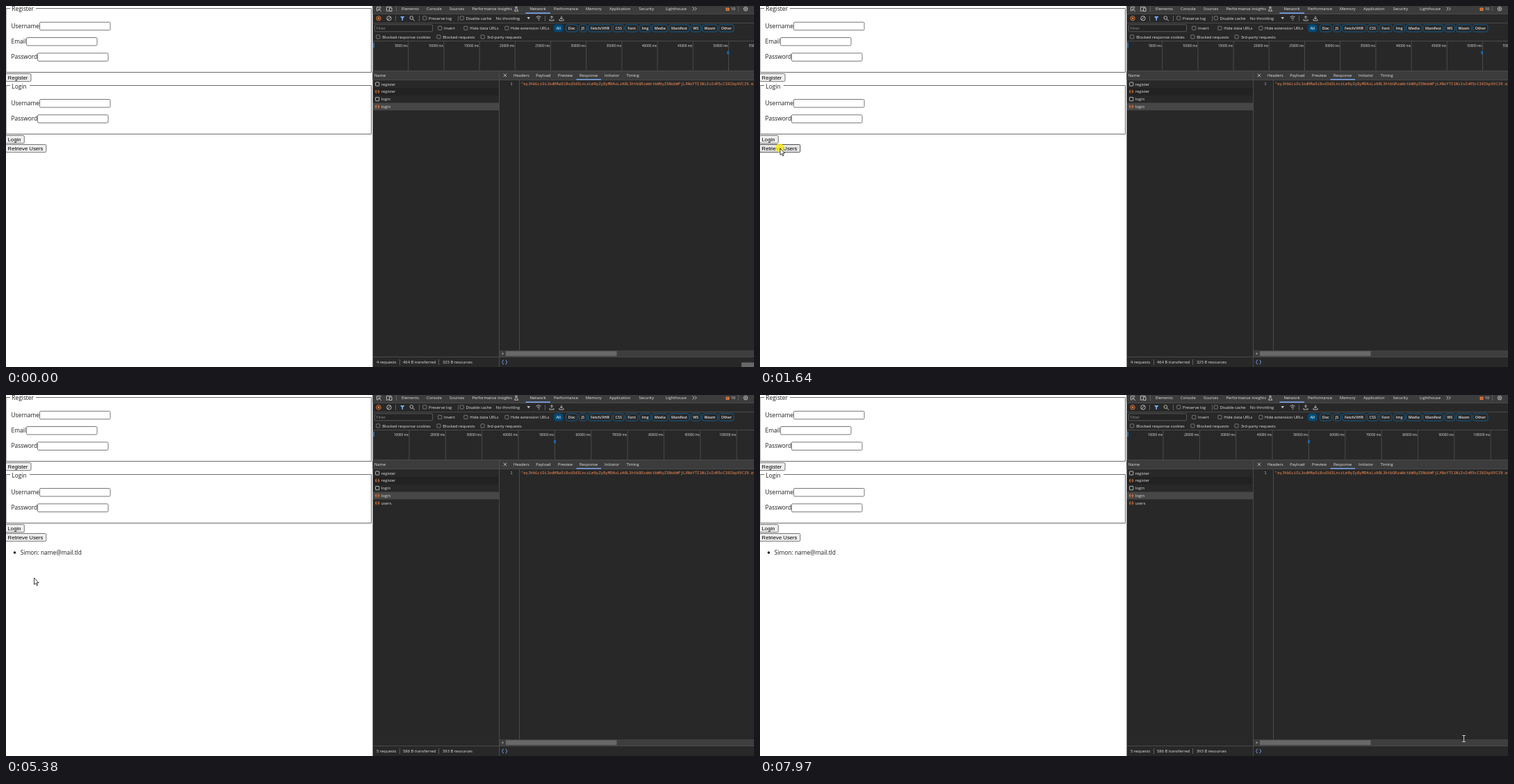
An HTML page for the animation above (8 s loop, 1076 px wide and 520 px high).

```html
<!DOCTYPE html>
<html lang="en">
<head>
<meta charset="utf-8">
<title>Login form and network panel</title>
<style>
html, body { margin: 0; width: 100%; height: 100%; overflow: hidden; background: #fff; }
svg { display: block; width: 1076px; height: 520px; }
text { white-space: pre; font: 5.8px "Open Sans", "Noto Sans", sans-serif; fill: #e3e3e3; }
.page { font-size: 8.4px; fill: #1c1c1c; }
.btn { font: 7.7px "Liberation Sans", Arial, sans-serif; fill: #000; }
.ms { font-size: 4.7px; text-anchor: end; }
.pill { font-size: 5.4px; font-weight: 600; text-anchor: middle; }
.code { font: 5.62px "DejaVu Sans Mono", "Noto Sans Mono", monospace; fill: #f28b54; }
.num { fill: #8ab4f8; }
.dim { fill: #8f8f8f; }
.ico { fill: none; stroke: #c7c7c7; stroke-width: .9; }
.blue { stroke: #7cacf8; }
.orange { stroke: #f0803c; }
</style>
</head>
<body>
<svg id="stage" viewBox="0 0 1076 520"></svg>
<script>
const NS = "http://www.w3.org/2000/svg";
const stage = document.getElementById("stage");

function add(tag, attrs, parent = stage) {
  const el = document.createElementNS(NS, tag);
  for (const k in attrs) el.setAttribute(k, attrs[k]);
  parent.appendChild(el);
  return el;
}
const rect = (x, y, width, height, fill, more, parent) =>
  add("rect", { x, y, width, height, fill, ...more }, parent);
const path = (d, cls = "ico", more, parent) => add("path", { d, class: cls, ...more }, parent);
const line = (d, stroke) => add("path", { d, stroke, fill: "none" });
function text(s, x, y, cls = "", parent = stage) {
  const el = add("text", { x, y, class: cls }, parent);
  el.textContent = s;
  return el;
}
const show = (el, on) => el.setAttribute("visibility", on ? "visible" : "hidden");

// Web page
const EDGE = "#767676";
rect(0, 0, 528, 520, "#fff");

function fieldset(title, top, bottom, gapEnd, baseline) {
  line(`M0 ${top}H6M${gapEnd} ${top}H525.5V${bottom}H0`, "#6b6b6b");
  line(`M.5 ${top}V${bottom}`, "#b5b5b5");
  text(title, 8.3, baseline, "page");
}
fieldset("Register", 3.5, 95.5, 43, 7);
fieldset("Login", 114.5, 184.5, 34, 119);

function field(label, baseline, x) {
  text(label, 7.5, baseline, "page");
  rect(x, baseline - 8.5, 101.5, 11.5, "#fff", { rx: 1.5, stroke: EDGE });
}
field("Username", 31.8, 48.5);
field("Email", 54, 29.5);
field("Password", 76.4, 45.5);
field("Username", 143, 48.5);
field("Password", 165.3, 45.5);

function button(label, y, width) {
  const box = rect(-.5, y, width, 11.2, "#efefef", { rx: 1.5, stroke: EDGE });
  text(label, 2.6, y + 8.5, "btn");
  return box;
}
button("Register", 97.5, 36.5);
button("Login", 186.5, 26.8);
const retrieve = button("Retrieve Users", 199.5, 58.3);

const ENTRY = "Simon: name@mail.tld";
const list = add("g", {});
add("circle", { cx: 12.5, cy: 227, r: 1.7, fill: "#111" }, list);
text(ENTRY, 20.8, 230.3, "page", list);
const clip = rect(0, 220, 0, 14, "#000", {}, add("clipPath", { id: "sel" }, add("defs", {})));
const picked = add("g", { "clip-path": "url(#sel)" });
rect(20, 220.5, 89, 13, "#3367d1", {}, picked);
text(ENTRY, 20.8, 230.3, "page", picked).style.fill = "#fff";

// Developer tools
const DARK = "#282828", BAR = "#3c3c3c", RULE = "#4a4a4a";
rect(527.5, 0, 548.5, 520, DARK);
rect(527.5, 0, 548.5, 11, BAR);
rect(527.5, 94, 548.5, 12.5, BAR);
line("M528 11.5H1076M528 24.5H1076M528 50.5H1076M528 93.5H1076M528 106.5H1076", RULE);

const labels = (y, items) => items.forEach(([s, x]) => text(s, x, y));
labels(6.2, [["Elements", 569], ["Console", 605], ["Sources", 638], ["Performance insights", 670.5],
  ["Network", 753.5], ["Performance", 788], ["Memory", 834], ["Application", 868],
  ["Security", 910.5], ["Lighthouse", 949], ["10", 1042.5]]);
rect(747.5, 9.5, 35.5, 1.5, "#7cacf8");
path("M539 2.5V1.5H533.5V7H535M536 4L540 8M536 4V7M536 4H539");
path("M547.5 6V1.5H554.5M546.5 7H551M551.5 3H555V7.5H551.5Z");
path("M732.5 1.5H735.5M733.2 1.5V4L731.5 7.2H736.8L734.9 4V1.5");
path("M987.5 1.5L990 4L987.5 6.5M990.8 1.5L993.3 4L990.8 6.5");
rect(1035.5, 2.5, 5, 4.5, "#f0803c", { rx: .8 });
path("M1036.8 4H1039.2M1036.8 5.5H1039.2", "", { stroke: "#3c3c3c", "stroke-width": .6 });
add("circle", { cx: 1064, cy: 4.2, r: 2.8, class: "ico", "stroke-width": 1.2 });
add("circle", { cx: 1064, cy: 4.2, r: 1, class: "ico" });

const divider = (x, y) => line(`M${x} ${y}v8`, "#5e5e5e");
[[561.5, 0], [1053.5, 0], [560.5, 14], [594.5, 14], [650.5, 14], [775.5, 14],
  [566.5, 509], [622.5, 509]].forEach(d => divider(...d));

add("circle", { cx: 536, cy: 17.8, r: 3.2, class: "ico orange" });
rect(534.7, 16.5, 2.6, 2.6, "#f0803c");
add("circle", { cx: 551, cy: 17.8, r: 3.2, class: "ico" });
path("M553.2 15.5L548.8 20");
path("M567 15H573.5L571 18V21H569.5V18Z", "", { fill: "#7cacf8" });
add("circle", { cx: 583.3, cy: 17, r: 2.3, class: "ico" });
path("M585 18.8L588 21.5");
path("M749.5 16H754L751.7 19.2Z", "", { fill: "#c7c7c7" });
path("M762.5 16Q766 13 769.5 16M764 18Q766 16.2 768 18M765.5 20H767.5");
path("M785 19V14.5M783 16.5L785 14.5L787 16.5M782 19V21H788V19");
path("M799 14.5V19M797 17L799 19L801 17M796 19V21H802V19");

function check(label, x, mid, textX) {
  rect(x, mid - 2.7, 5.2, 5.2, "none", { rx: .8, stroke: "#8a8a8a", "stroke-width": .8 });
  text(label, textX, mid + 2.2);
}
check("Preserve log", 599.7, 17.5, 608);
check("Disable cache", 653.2, 17.5, 661.5);
text("No throttling", 704.8, 19.7);
rect(530.5, 26.8, 83, 10, "#242424", { rx: 1, stroke: "#666", "stroke-width": .8 });
text("Filter", 532.5, 34.2, "dim");
check("Invert", 621.6, 32, 630);
check("Hide data URLs", 658.8, 32, 667.3);
check("Hide extension URLs", 717.8, 32, 726);
check("Blocked response cookies", 532.6, 44.5, 541.3);
check("Blocked requests", 619.8, 44.5, 628.3);
check("3rd-party requests", 683, 44.5, 691.7);

[["All", 788.5, 801], ["Doc", 805.5, 822], ["JS", 824.5, 835.5], ["Fetch/XHR", 837.5, 871.5],
  ["CSS", 873.5, 889], ["Font", 891, 909], ["Img", 911.5, 927.5], ["Media", 929.5, 952],
  ["Manifest", 954, 983], ["WS", 985, 999.5], ["Wasm", 1001.5, 1023.5], ["Other", 1025.5, 1047]
].forEach(([s, a, b], i) => {
  rect(a, 26.8, b - a, 10.4, i ? "none" : "#004a77",
    { rx: 3, stroke: i ? "#0d6299" : "#004a77", "stroke-width": .9 });
  text(s, (a + b) / 2, 34, "pill");
});

// Overview ruler: gap in pixels, step in milliseconds
function ruler(first, gap, step, mark) {
  const g = add("g", {});
  for (let i = 0; i < 11; i++) {
    const x = first + gap * i;
    path(`M${x} 51V93`, "", { stroke: "#4a4a4a" }, g);
    text(`${step * (i + 1)} ms`, x - 1, 58.8, "ms", g);
  }
  rect(mark, 65, 3, 4.5, "#1567ad", {}, g);
  return g;
}
const rulerBefore = ruler(578.7, 51.2, 5000, 1037.2);
const rulerAfter = ruler(580, 52.35, 10000, 788);
line("M528.5 51V93", "#14507e");
rect(528, 53, 2, 7, "#1a73c8");

// Request list
const filler = rect(528, 161, 181, 344.5, "#404040");
rect(528, 118, 181, 10.7, "#222");
rect(528, 139.5, 181, 10.8, "#474747");
text("Name", 530, 102.2);

function request(name, i, isCode) {
  const g = add("g", {}), y = 112.5 + i * 10.8;
  if (isCode) {
    path(`M532.7 ${y - 2.6}Q530 ${y} 532.7 ${y + 2.6}M535.6 ${y - 2.6}Q538.3 ${y} 535.6 ${y + 2.6}` +
      `M533.6 ${y - 1}l-1 1l1 1M534.8 ${y - 1}l1 1l-1 1`, "ico orange", {}, g);
  } else {
    rect(531.6, y - 2.6, 5.2, 5.2, "none", { rx: .6, class: "ico" }, g);
  }
  text(name, 539.8, y + 2.1, "", g);
  return g;
}
request("register", 0);
request("register", 1, true);
request("login", 2);
request("login", 3, true);
const usersRow = request("users", 4, true);

// Response pane
path("M715.8 97.7L720.2 102.1M720.2 97.7L715.8 102.1");
labels(102.2, [["Headers", 730], ["Payload", 762.3], ["Preview", 794], ["Response", 825],
  ["Initiator", 861], ["Timing", 892.5]]);
rect(820.5, 105.2, 35.5, 1.4, "#7cacf8");
line("M709.5 94V520M738.5 107V496", RULE);
text("1", 725.3, 114.3, "code num");
text('"eyJhbGciOiJodHRwOi8vd3d3LnczLm9yZy8yMDAxLzA0L3htbGRzaWctbW9yZSNobWFjLXNoYTI1NiIsInR5cCI6IkpXVCJ9.eyJ',
  740.8, 114.3, "code");
rect(710, 496, 366, 9.5, "#3e3e3e");
rect(719, 497.2, 159.5, 7, "#686868");
path("M715.3 499L713 500.8L715.3 502.6Z", "", { fill: "#a0a0a0" });
line("M528 505.5H1076", RULE);
path("M715.8 510Q714.4 510 714.6 511.8L713.4 513L714.6 514.2Q714.4 516 715.8 516" +
  "M718.6 510Q720 510 719.8 511.8L721 513L719.8 514.2Q720 516 718.6 516", "ico blue");
const status = ["4 requests|464 B transferred|325 B resources", "5 requests|586 B transferred|393 B resources"]
  .map(row => {
    const g = add("g", {});
    row.split("|").forEach((s, i) => text(s, [533, 571, 628][i], 515.2, "", g));
    return g;
  });
const corner = rect(1058, 513.5, 18, 6.5, "#686868");

// Pointer
const ring = add("circle", { fill: "#fbea10" });
const arrow = path("M0 0V9.5L2.2 7.6L3.8 11L5.2 10.4L3.7 7H6.6Z", "",
  { fill: "#fff", stroke: "#111", "stroke-width": .8 });
const beam = path("M-2.3 -4.5H2.3M0 -4.5V4.5M-2.3 4.5H2.3", "ico");

// Each move: points of [time, x, y]; the pointer rests between moves
const moves = [
  [[2, 1076, 540], [70, 1040, 506], [340, 720, 262], [545, 455, 152], [684, 405.5, 165], [820, 210, 227]],
  [[822, 210, 227], [1100, 95, 214], [1350, 40, 206], [1640, 29, 205]],
  [[1982, 29, 205], [2250, 92, 222], [2455, 126.5, 230]],
  [[2992, 126.5, 230], [3190, 110, 229], [3540, 45, 230], [3740, 23, 234]],
  [[4580, 23, 234], [4800, 34, 247], [4990, 40.5, 255]],
  [[5182, 40.5, 255], [5380, 40.5, 263.5]],
  [[6372, 40.5, 263.5], [6600, 170, 272], [6830, 500, 315], [7054, 717, 338], [7200, 787.5, 351]],
  [[7212, 787.5, 351], [7345, 797.5, 354]],
  [[7422, 797.5, 354], [7700, 915, 430], [7965, 1012.5, 495]]
];
const HOLD = 68.2;

function pointer(t) {
  const move = moves.filter(m => m[0][0] + HOLD - 15 <= t).pop();
  if (!move) return moves[0][0].slice(1);
  const start = move[0][0];
  const at = start + Math.floor((t - start + 15) / HOLD) * HOLD;
  const i = move.findIndex(p => p[0] > at);
  if (i < 0) return move[move.length - 1].slice(1);
  const a = move[Math.max(i - 1, 0)], b = move[i];
  const k = (at - a[0]) / (b[0] - a[0]);
  return [a[1] + (b[1] - a[1]) * k, a[2] + (b[2] - a[2]) * k];
}

const clicks = [1610, 4000, 4420];

function draw(t) {
  const [x, y] = pointer(t);
  const fetched = t >= 1720, listed = t >= 1780;
  show(corner, t < 70);
  show(rulerBefore, !fetched);
  show(rulerAfter, fetched);
  show(usersRow, fetched);
  show(status[0], !fetched);
  show(status[1], fetched);
  show(list, listed);
  show(filler, t >= 6850 && t < 7135);

  const over = x < 58 && y > 199 && y < 211;
  retrieve.setAttribute("fill", over ? "#e5e5e5" : "#efefef");
  retrieve.setAttribute("stroke", over ? "#4f4f4f" : EDGE);

  const selecting = t >= 3190 && t < 4440;
  const from = Math.min(109, Math.max(x + 1.8, 24.8));
  show(picked, selecting);
  clip.setAttribute("x", from);
  clip.setAttribute("width", 109 - from);

  const inText = listed && x > 21 && x < 109 && y > 220 && y < 233.5;
  const inCode = x > 738 && y > 107 && y < 496;
  const useBeam = inText || inCode;
  show(arrow, !useBeam);
  show(beam, useBeam);
  beam.style.stroke = inCode ? "#ddd" : "#111";
  (useBeam ? beam : arrow).setAttribute("transform", `translate(${x} ${y})`);

  const hit = clicks.find(c => t >= c && t < c + 160);
  show(ring, hit !== undefined);
  if (hit !== undefined) {
    const p = (t - hit) / 160;
    ring.setAttribute("cx", x - .5);
    ring.setAttribute("cy", y - .5);
    ring.setAttribute("r", 5 + 7 * p);
    ring.setAttribute("opacity", 1 - p);
  }
}

const begin = performance.now();
function tick() {
  draw((performance.now() - begin) % 8000);
  requestAnimationFrame(tick);
}
tick();
</script>
</body>
</html>
```
